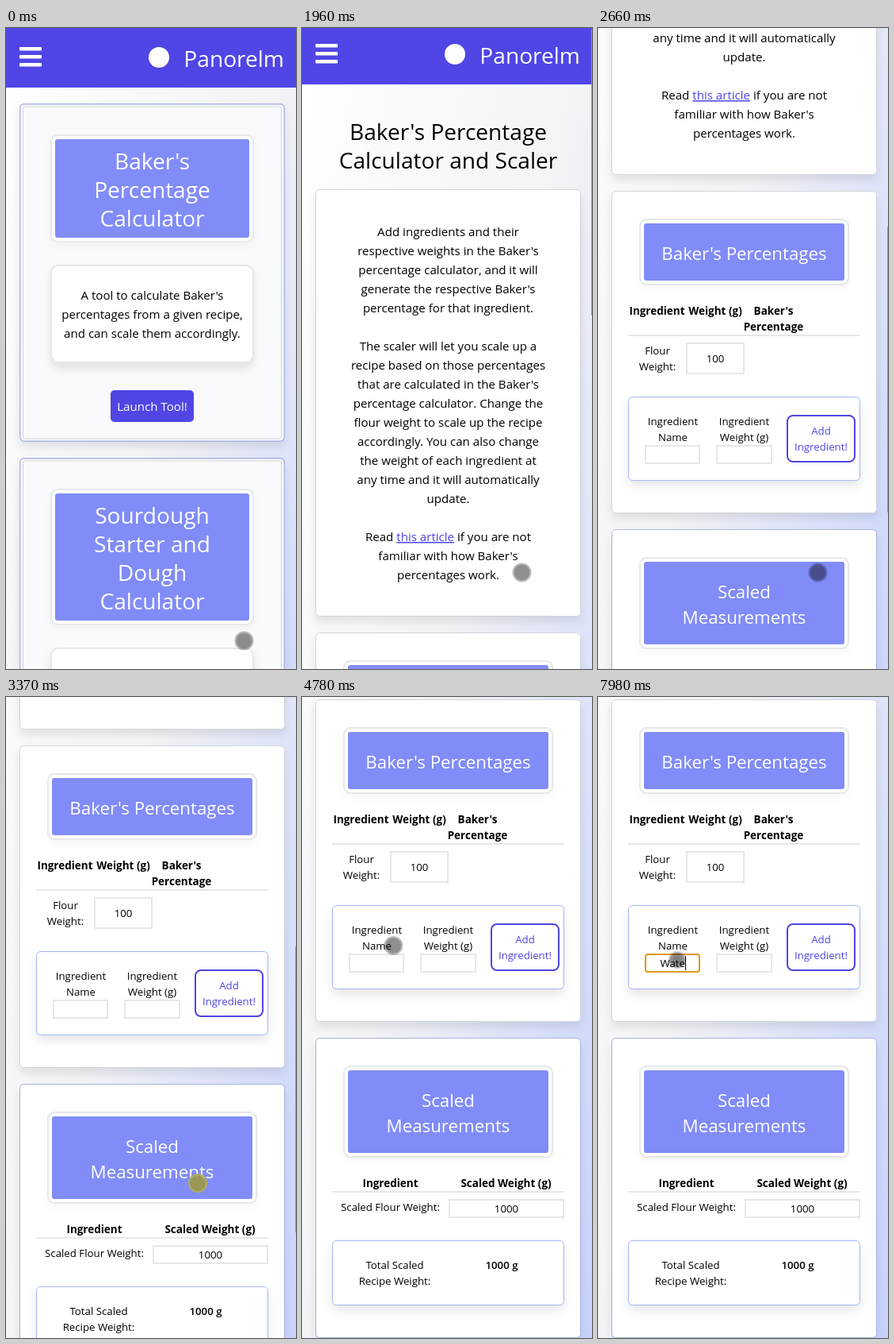
An HTML page that plays this animation: 366 px wide and 807 px high, repeating every 8 s.

```html
<!DOCTYPE html>
<html lang="en">
<head>
<meta charset="utf-8">
<style>
html, body { margin: 0; width: 100%; height: 100%; overflow: hidden; background: #fff; }
svg { display: block; width: 366px; height: 807px; }
text { font-family: "Open Sans", "Noto Sans", sans-serif; text-anchor: middle; white-space: pre; }
.shadow { filter: drop-shadow(0 7px 6px rgba(0,0,0,.09)); }
.soft { filter: drop-shadow(0 5px 4px rgba(0,0,0,.03)); }
.link { fill: #4f46e5; text-decoration: underline; }
</style>
</head>
<body>
<svg id="stage" viewBox="0 0 366 807"></svg>
<script>
const INDIGO = '#4f46e5', LILAC = '#818cf8', PALE = '#a5b4fc', GRAY = '#e5e7eb';
const BODY = 15.1, SMALL = 13.25, TITLE = 28.1, HEADING = 22.3;

// Boxes are given by their outer edges; the border lies inside.
const box = (x1, y1, x2, y2, fill, stroke = 'none', line = 0, r = 0, extra = '') =>
  `<rect x="${x1 + line / 2}" y="${y1 + line / 2}" width="${x2 - x1 - line}" height="${y2 - y1 - line}"
    rx="${r}" fill="${fill}" stroke="${stroke}" stroke-width="${line}" ${extra}/>`;
const text = (x, y, size, str, fill = '#000', extra = '') =>
  `<text x="${x}" y="${y}" font-size="${size}" fill="${fill}" ${extra}>${str}</text>`;
const lines = (x, y, size, gap, list, fill) =>
  list.map((str, i) => text(x, y + i * gap, size, str, fill)).join('');
const bold = (x, y, str) => text(x, y, 13.5, str, '#000', 'font-weight="700"');
const input = (x1, y1, x2, y2, extra) => box(x1, y1, x2, y2, '#fff', GRAY, 2, 0, extra);
const card = (y1, y2, stroke) => box(17, y1, 352, y2, '#fff', stroke, 1, 5, 'class="shadow"');
const badge = (x1, y1, x2, y2) =>
  box(x1, y1, x2, y2, '#fff', GRAY, 2, 8, 'class="soft"') + box(x1 + 6, y1 + 6, x2 - 6, y2 - 6, LILAC, 'none', 0, 3);
const panel = (y1, y2) => box(38, y1, 331, y2, '#fff', PALE, 1, 5, 'class="shadow"');

const header = box(0, 0, 366, 75, INDIGO)
  + [24, 34, 44].map(y => box(17, y, 45, y + 4.5, '#fff', 'none', 0, 1)).join('')
  + '<circle cx="193" cy="37" r="13" fill="#fff"/>'
  + text(351, 49, TITLE, 'Panorelm', '#fff', 'style="text-anchor:end"');

const toolCard = (y1, y2) =>
  box(17, y1, 352, y2, '#f9fafb', '#a9b4e6', 1.4, 5, 'class="shadow"')
  + box(21, y1 + 3.5, 348, y2 - 3.5, 'none', '#d1d5db', 1, 2);

const home = box(0, 0, 366, 1100, 'url(#wash)') + header
  + toolCard(95, 521) + badge(56, 134, 313, 270)
  + lines(184.5, 178, TITLE, 36, ["Baker's", 'Percentage', 'Calculator'], '#fff')
  + box(56, 298, 313, 422, '#fff', GRAY, 2, 9, 'class="shadow"')
  + lines(184.5, 342, BODY, 24, ["A tool to calculate Baker's", 'percentages from a given recipe,', 'and can scale them accordingly.'])
  + box(132, 456, 237, 496, INDIGO, 'none', 0, 5, 'id="launch"')
  + text(184.5, 482, BODY, 'Launch Tool!', '#fff')
  + toolCard(541, 980) + badge(56, 580, 313, 752)
  + lines(184.5, 624, TITLE, 36, ['Sourdough', 'Starter and', 'Dough', 'Calculator'], '#fff')
  + box(56, 780, 313, 900, '#fff', GRAY, 2, 9, 'class="shadow"');

const intro = [
  'Add ingredients and their', "respective weights in the Baker's", 'percentage calculator, and it will',
  "generate the respective Baker's", 'percentage for that ingredient.', '',
  'The scaler will let you scale up a', 'recipe based on those percentages', "that are calculated in the Baker's",
  'percentage calculator. Change the', 'flour weight to scale up the recipe', 'accordingly. You can also change',
  'the weight of each ingredient at', 'any time and it will automatically', 'update.', '',
  'Read <tspan class="link">this article</tspan> if you are not', "familiar with how Baker's", 'percentages work.'];

const percentages = card(3, 409, '#d1d5db') + badge(52, 38, 317, 122)
  + text(184.5, 90, HEADING, "Baker's Percentages", '#fff')
  + bold(74.5, 159, 'Ingredient') + bold(148, 159, 'Weight (g)')
  + bold(221.5, 159, "Baker's") + bold(221.5, 179, 'Percentage')
  + box(38, 184, 331, 186, GRAY)
  + lines(75, 209, SMALL, 20, ['Flour', 'Weight:'])
  + input(111, 194, 185, 234) + text(148, 219, SMALL, '100')
  + panel(262, 368)
  + lines(94.5, 298, SMALL, 20, ['Ingredient', 'Name']) + input(59, 323, 129, 347, 'id="field"')
  + lines(184.5, 298, SMALL, 20, ['Ingredient', 'Weight (g)']) + input(149, 323, 220, 347)
  + box(238, 285, 325, 345, '#fff', INDIGO, 2, 7)
  + lines(281.5, 310, SMALL, 20, ['Add', 'Ingredient!'], INDIGO);

const scaled = card(429, 807, '#a9b4e0') + badge(52, 464, 317, 580)
  + lines(184.5, 516, HEADING, 32, ['Scaled', 'Measurements'], '#fff')
  + bold(111.5, 617, 'Ingredient') + bold(257.5, 617, 'Scaled Weight (g)')
  + box(38, 622, 331, 624, GRAY)
  + text(111.5, 647, SMALL, 'Scaled Flour Weight:')
  + input(185, 632, 331, 656) + text(258, 649, SMALL, '1000')
  + panel(684, 766)
  + lines(117, 720, SMALL, 20, ['Total Scaled', 'Recipe Weight:'])
  + text(252, 720, SMALL, '1000 g', '#000', 'font-weight="600"');

const tool = box(0, 0, 366, 1590, 'url(#wash)') + header
  + lines(184.5, 145, TITLE, 36, ["Baker's Percentage", 'Calculator and Scaler'])
  + card(207, 745, '#d1d5db') + lines(184.5, 266, BODY, 24, intro)
  + `<g transform="translate(0 762)">${percentages}${scaled}</g>`;

const stage = document.getElementById('stage');
stage.innerHTML = `
  <defs>
    <linearGradient id="wash" x1="0" y1="0" x2="1" y2="1">
      <stop stop-color="#fff"/><stop offset=".5" stop-color="#f3f4f6"/><stop offset="1" stop-color="#c7d2fe"/>
    </linearGradient>
    <radialGradient id="blur">
      <stop offset=".3" stop-opacity=".5"/><stop offset=".7" stop-opacity=".42"/><stop offset="1" stop-opacity="0"/>
    </radialGradient>
  </defs>
  <g id="home">${home}</g>
  <g id="tool">${tool}</g>
  <rect id="thumb" x="365" width="1" height="360" fill="#999"/>
  <g id="pointer"><circle id="disc" r="10"/><circle id="ring" r="11" fill="none" stroke-width="2"/></g>
  ${text(94.2, 339.5, SMALL, '', '#000', 'id="typed"')}
  <rect id="caret" y="326" width="1" height="18"/>`;
const el = Object.fromEntries([...stage.querySelectorAll('[id]')].map(node => [node.id, node]));

const LOOP = 8000, TICK = 78.15;
const pointerPath = [[0, 300.5, 771.5], [11, 198.5, 479.5], [14, 198.5, 479.5], [20, 277.5, 685.5], [35, 277.5, 685.5],
  [40, 242, 616], [42, 242, 616], [43, 242, 612], [47, 251, 557.5], [51, 251, 557.5],
  [57, 170, 243], [62, 109, 321], [67, 100, 331]];
const scrollPath = [[24, 0], [25, 4], [30, 400], [31, 400], [34, 560], [37, 700], [42, 700], [43, 704], [47, 762]];
const typing = [[0, ''], [73, 'W'], [75, 'WE'], [82, 'W'], [84, 'Wa'], [93, 'Wat'], [98, 'Wate']];
const presses = [[12, 13], [42, 48], [64, 65]];

const linear = u => u, smooth = u => u * u * (3 - 2 * u);
function along(path, k, ease) {
  const next = path.findIndex(key => key[0] > k);
  if (next < 0) return path[path.length - 1].slice(1);
  if (next === 0) return path[0].slice(1);
  const a = path[next - 1], b = path[next], u = ease((k - a[0]) / (b[0] - a[0]));
  return a.slice(1).map((v, i) => v + (b[i + 1] - v) * u);
}
const set = (node, attrs) => Object.entries(attrs).forEach(([name, value]) => node.setAttribute(name, value));
const show = (node, on) => node.setAttribute('visibility', on ? 'visible' : 'hidden');

function draw(ms) {
  const k = Math.floor((ms % LOOP) / TICK);
  const onTool = k >= 25, focused = k >= 65;
  const pressed = presses.some(([from, to]) => k >= from && k <= to);
  el.home.style.display = onTool ? 'none' : '';
  el.tool.style.display = onTool ? '' : 'none';

  const [scroll] = along(scrollPath, k, linear);
  set(el.tool, { transform: `translate(0 ${-Math.round(scroll)})` });
  set(el.thumb, { y: scroll * 340 / 762, opacity: Math.max(0, Math.min(1, (56 - k) / 4)) });
  show(el.thumb, onTool);
  set(el.launch, { fill: k === 12 ? '#4338ca' : INDIGO });

  const [x, y] = along(pointerPath, k, smooth);
  set(el.pointer, { transform: `translate(${x} ${y})` });
  const resting = k > 66;
  set(el.disc, {
    r: resting ? 12 : 10,
    fill: pressed ? '#9c984d' : resting ? 'url(#blur)' : '#000',
    'fill-opacity': pressed ? .95 : resting ? 1 : .44
  });
  set(el.ring, { stroke: pressed ? '#b5b052' : '#000', 'stroke-opacity': pressed ? .9 : .27 });
  show(el.ring, !resting);

  set(el.field, { stroke: focused ? '#e09a12' : GRAY, rx: focused ? 3 : 0 });
  el.typed.textContent = typing.filter(([from]) => from <= k).pop()[1];
  const width = el.typed.textContent ? el.typed.getComputedTextLength() : 0;
  set(el.caret, { x: Math.round(94 + width / 2) });
  show(el.caret, focused);
}

let start;
function frame(now) {
  start ??= now;
  draw(now - start);
  requestAnimationFrame(frame);
}
draw(0);
requestAnimationFrame(frame);
</script>
</body>
</html>
```
